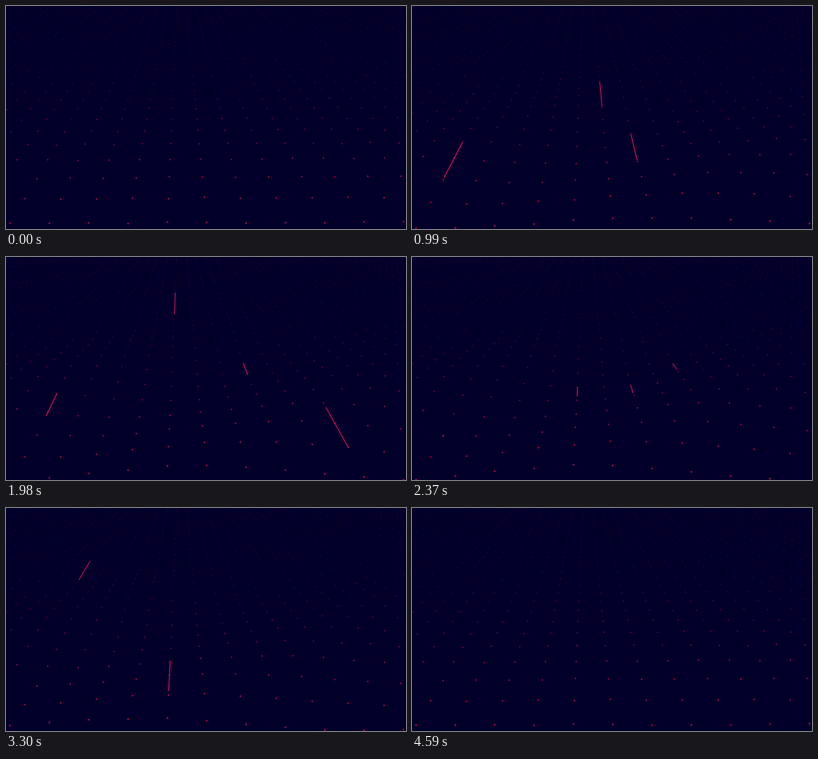
These frames come from a looping animation (500x279 px, 4.62 s). An HTML page with a canvas:

```html
<!DOCTYPE html>
<html lang="en">
<head>
<meta charset="utf-8">
<title>Dot field</title>
<style>
  html, body { margin: 0; width: 100%; height: 100%; overflow: hidden; background: #02002a; }
  canvas { display: block; width: 500px; height: 279px; }
</style>
</head>
<body>
<canvas id="stage" width="500" height="279"></canvas>
<script>
const ctx = document.getElementById('stage').getContext('2d');
const W = 500, H = 279, LOOP = 4620;
const ROWS = 34;
const HORIZON = -87.5, VANISH_X = 217.4;
const TRAVEL = 350, TAIL_DELAY = 250;

const clamp = (v, lo, hi) => Math.min(hi, Math.max(lo, v));
const lerp = (a, b, p) => a + (b - a) * p;
const swing = ms => Math.cos(2 * Math.PI * ms / LOOP);

function ease(p) {
  p = clamp(p, 0, 1);
  return p < 0.5 ? 2 * p * p : 1 - 2 * (1 - p) * (1 - p);
}

function hash(a, b) {
  const v = Math.sin(a * 127.1 + b * 311.7) * 43758.5453;
  return v - Math.floor(v);
}

const depthY = row => 3781 / (10.54 + row);
const spacing = row => 0.1371 * depthY(row);

// Each streak runs toward the viewer along one column, farther ones over more rows.
const streak = (start, col, row) => ({ start, col, to: row, from: row + 2 + Math.floor(row / 7) });

// A near and a far streak leave together on each main beat.
const pair = (start, near, far) => [streak(start, ...near), streak(start, ...far)];

// Between the main beats, small groups leave from random places.
const scatter = start => [1, 2, 3].map(i => streak(start,
  Math.floor(hash(start, i) * 10) - 4, 2 + Math.floor(hash(i, start) * 9)));

const streaks = [
  ...pair(240, [2, 1], [2, 9]),
  ...pair(1140, [-1, 1], [6, 7]),
  ...pair(1650, [5, 1], [0, 14]),
  ...pair(1800, [-4, 2], [3, 5]),
  ...pair(2490, [-3, 3], [-4, 11]),
  ...pair(3040, [0, 1], [-5, 11]),
  ...[70, 700, 2230, 3480].flatMap(scatter)
];

// A slightly tilted, uneven plane with a diagonal wave that starts from rest.
function place(col, row, t) {
  const s = spacing(row);
  const peak = 190 + 480 * row - 380 * col;
  const wave = 0.105 * (swing(t - peak) - swing(peak));
  const bump = 0.05 * (hash(col, row) - 0.5) - 0.006 * (col - 1);
  return {
    x: VANISH_X + s * (col - 0.318),
    y: HORIZON + depthY(row) + s * (wave + bump)
  };
}

function drawDots(t) {
  for (let row = ROWS; row >= 0; row--) {
    const s = spacing(row);
    const last = Math.ceil((W - VANISH_X) / s) + 1;
    const near = clamp((depthY(row) + HORIZON) / 200, 0, 1);
    for (let col = -Math.ceil(VANISH_X / s); col <= last; col++) {
      const p = place(col, row, t);
      const glow = lerp(0.65 + 0.5 * hash(row, col), 1, near);
      ctx.globalAlpha = (0.18 + 0.57 * near) * glow;
      ctx.beginPath();
      ctx.arc(p.x, p.y, Math.max(0.5, s * 0.0225), 0, 2 * Math.PI);
      ctx.fill();
    }
  }
}

function drawStreaks(t) {
  ctx.globalAlpha = 0.85;
  for (const { start, col, from, to } of streaks) {
    const age = t - start;
    if (age <= 0 || age >= TRAVEL + TAIL_DELAY) continue;
    const a = place(col, from, t), b = place(col, to, t);
    const head = ease(age / TRAVEL), tail = ease((age - TAIL_DELAY) / TRAVEL);
    ctx.lineWidth = clamp(spacing(to) * 0.03, 1.05, 1.2);
    ctx.beginPath();
    ctx.moveTo(lerp(a.x, b.x, tail), lerp(a.y, b.y, tail));
    ctx.lineTo(lerp(a.x, b.x, head), lerp(a.y, b.y, head));
    ctx.stroke();
  }
}

function draw(t) {
  ctx.globalAlpha = 1;
  ctx.fillStyle = '#02002a';
  ctx.fillRect(0, 0, W, H);
  ctx.fillStyle = '#e8104f';
  drawDots(t);
  ctx.strokeStyle = '#ee0c5a';
  ctx.lineCap = 'round';
  drawStreaks(t);
}

const begin = performance.now();
function tick() {
  draw((performance.now() - begin) % LOOP);
  requestAnimationFrame(tick);
}
tick();
</script>
</body>
</html>
```
